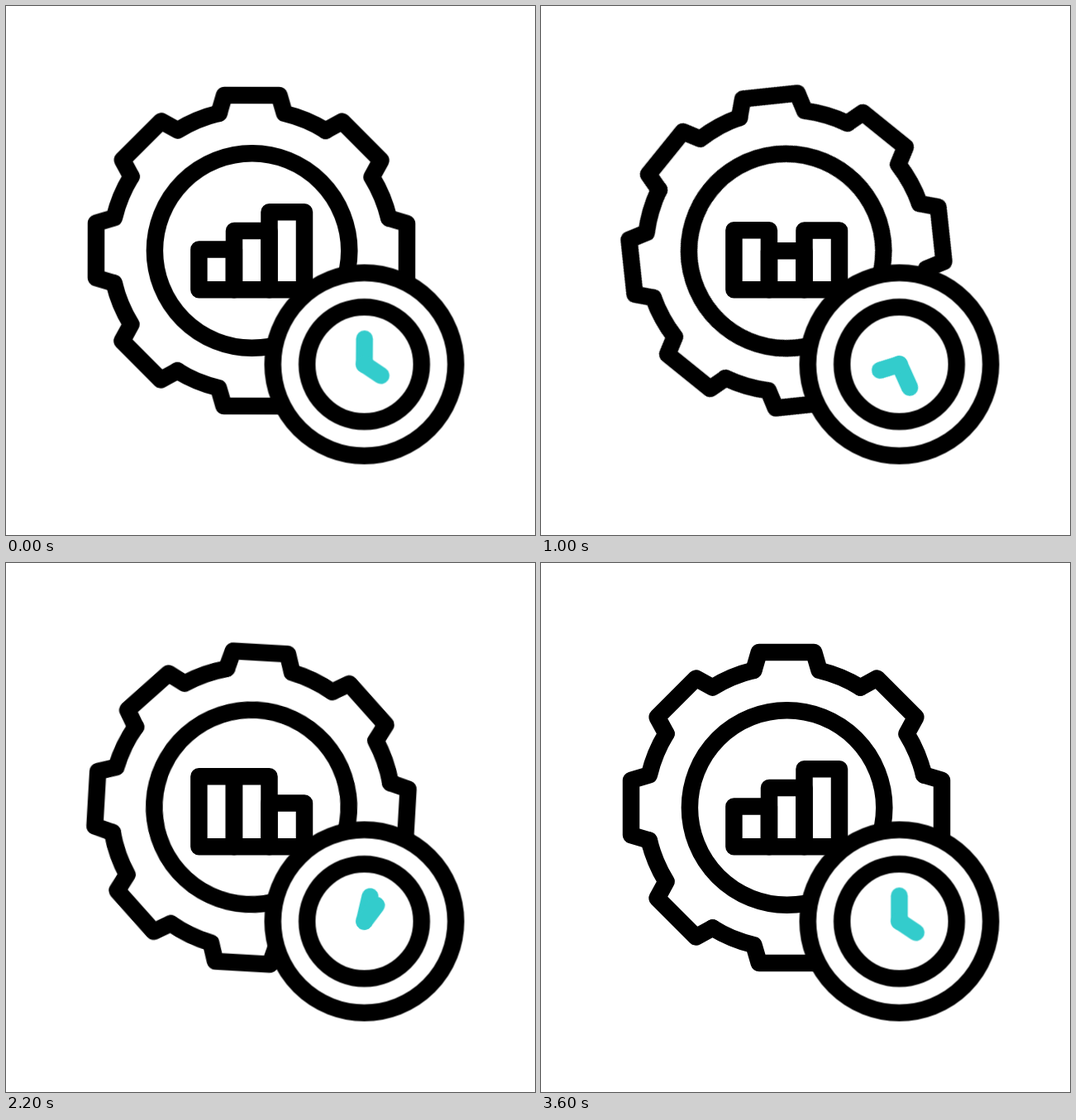
An HTML page that plays this animation: 640x640 px, repeating every 3620 ms.

```html
<!DOCTYPE html>
<html lang="en">
<head>
<meta charset="utf-8">
<title>Gear, chart and clock</title>
<style>
  html, body { margin: 0; width: 100%; height: 100%; overflow: hidden; background: #fff; }
  svg { display: block; width: 100vw; height: 100vh; }

  .ink {
    fill: none;
    stroke: #000;
    stroke-width: 20.5;
    stroke-linecap: round;
    stroke-linejoin: round;
  }
  .hand { stroke: #3cc; }
  .face { fill: #fff; }

  /* 3600 ms of motion, then a 20 ms hold */
  .turn, .turn4 {
    animation: turn 3620ms cubic-bezier(.167, .167, .667, 1) infinite;
  }
  .turn { --end: 360deg; }
  .turn4 { --end: 1440deg; }
  @keyframes turn {
    0% { transform: rotate(0deg); }
    99.448%, 100% { transform: rotate(var(--end)); }
  }

  /* Bar tops at the quarter points; the base stays put */
  .bar {
    --base: 343.3px;
    width: 42.5px;
    animation: bar 3620ms cubic-bezier(.333, 0, .667, 1) infinite;
  }
  .low  { --a: 294.5px; --b: 272px;   --c: 248.3px; --d: 271.8px; }
  .mid  { --a: 272px;   --b: 297.2px; --c: 270.7px; --d: 241px; }
  .high { --a: 249.3px; --b: 270.2px; --c: 303.8px; --d: 271.8px; }
  @keyframes bar {
    0%, 99.448%, 100% { y: var(--a); height: calc(var(--base) - var(--a)); }
    24.862% { y: var(--b); height: calc(var(--base) - var(--b)); }
    49.724% { y: var(--c); height: calc(var(--base) - var(--c)); }
    74.586% { y: var(--d); height: calc(var(--base) - var(--d)); }
  }
</style>
</head>
<body>
<svg viewBox="0 0 640 640" class="ink">
  <defs>
    <path id="tooth" d="M-39.6-166.1 L-33.2-188 H33.2 L39.6-166.1 A170.8 170.8 0 0 1 89.5-145.5"/>
  </defs>

  <g transform="translate(297 296)">
    <g class="turn">
      <use href="#tooth"/>
      <use href="#tooth" transform="rotate(45)"/>
      <use href="#tooth" transform="rotate(90)"/>
      <use href="#tooth" transform="rotate(135)"/>
      <use href="#tooth" transform="rotate(180)"/>
      <use href="#tooth" transform="rotate(225)"/>
      <use href="#tooth" transform="rotate(270)"/>
      <use href="#tooth" transform="rotate(315)"/>
      <circle cx=".6" r="117.7"/>
    </g>
  </g>

  <rect class="bar low" x="233.4"/>
  <rect class="bar mid" x="276"/>
  <rect class="bar high" x="318.5"/>

  <g transform="translate(433.5 433.5)">
    <circle class="face" r="110.7"/>
    <circle r="69.3"/>
    <path class="hand turn4" d="M0 0 V-30.8"/>
    <path class="hand turn" d="M0 0 L20.2 13.6"/>
  </g>
</svg>
</body>
</html>
```
